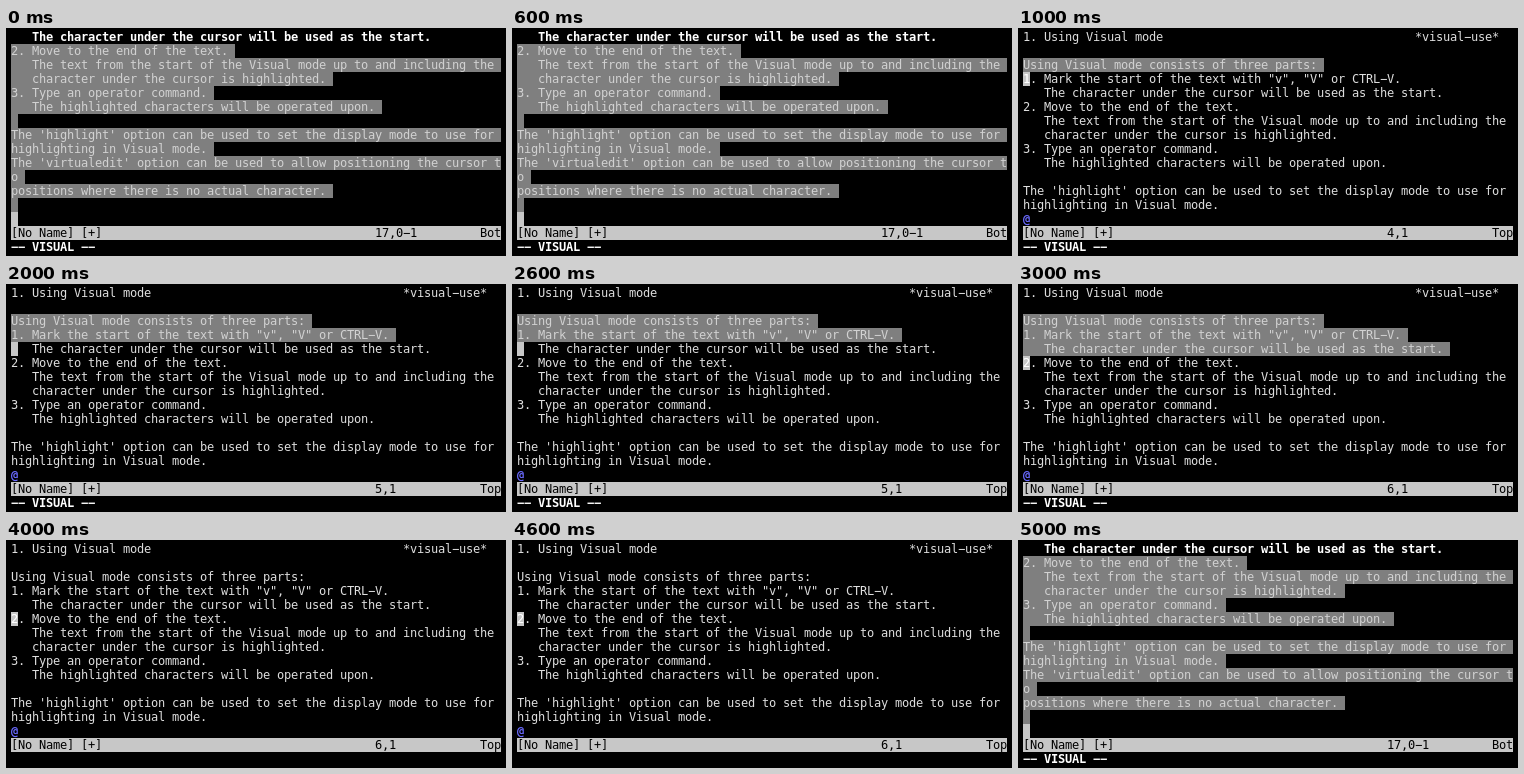
These frames come from a looping animation (500 by 228 pixels, 6000 ms). An HTML page with a canvas:

```html
<!DOCTYPE html>
<html lang="en">
<head>
<meta charset="utf-8">
<title>Visual mode</title>
<style>
  html, body { margin: 0; width: 100%; height: 100%; overflow: hidden; background: #000; }
  canvas { display: block; width: 500px; height: 228px; }
</style>
</head>
<body>
<canvas id="screen" width="500" height="228"></canvas>
<script>
const CELL = { w: 7, h: 14, left: 5, top: 2, baseline: 11 };
const COLUMNS = 70, TEXT_ROWS = 14;
const COLOR = {
  back: '#000', text: '#dedede', bright: '#fff', select: '#7f7f7f',
  selected: '#d2d2d2', bar: '#c7c7c7', filler: '#6a6aff'
};

const buffer = [
  '1. Using Visual mode'.padEnd(56) + '*visual-use*',
  '',
  'Using Visual mode consists of three parts:',
  '1. Mark the start of the text with "v", "V" or CTRL-V.',
  '   The character under the cursor will be used as the start.',
  '2. Move to the end of the text.',
  '   The text from the start of the Visual mode up to and including the',
  '   character under the cursor is highlighted.',
  '3. Type an operator command.',
  '   The highlighted characters will be operated upon.',
  '',
  "The 'highlight' option can be used to set the display mode to use for",
  'highlighting in Visual mode.',
  "The 'virtualedit' option can be used to allow positioning the cursor t",
  'o',
  'positions where there is no actual character.',
  '',
  ''
];

// Line numbers are buffer indexes; from = first selected line, or null.
const bottom = { scroll: 4, from: 5, cursor: 17, ruler: '17,0-1', place: 'Bot', strong: 4 };
const top_ = (from, cursor, ruler) => ({ scroll: 0, from, cursor, ruler, place: 'Top' });
const steps = [
  bottom,
  top_(2, 3, '4,1'),
  top_(2, 4, '5,1'),
  top_(2, 5, '6,1'),
  top_(null, 5, '6,1'),
  bottom
];
const STEP_MS = 1000;

const ctx = document.getElementById('screen').getContext('2d', { alpha: false });

function fillCells(col, row, count, color) {
  ctx.fillStyle = color;
  ctx.fillRect(CELL.left + col * CELL.w, CELL.top + row * CELL.h, count * CELL.w, CELL.h);
}

function write(text, col, row, color, weight = 'normal') {
  ctx.font = `${weight} 12px "DejaVu Sans Mono", monospace`;
  ctx.fillStyle = color;
  const y = CELL.top + row * CELL.h + CELL.baseline;
  // The wide minus matches the terminal's long hyphen.
  [...text.replace(/-/g, '\u2212')].forEach((char, i) => {
    if (char !== ' ') ctx.fillText(char, CELL.left + (col + i) * CELL.w, y);
  });
}

function drawLine(state, row) {
  const line = row + state.scroll;
  const text = buffer[line];
  const selected = state.from !== null && line >= state.from && line < state.cursor;
  if (selected) fillCells(0, row, Math.min(text.length + 1, COLUMNS), COLOR.select);
  if (line === state.cursor) fillCells(0, row, 1, COLOR.bar);

  const strong = line === state.strong;
  const color = selected ? COLOR.selected : strong ? COLOR.bright : COLOR.text;
  write(text, 0, row, color, strong ? 'bold' : 'normal');
  if (line === state.cursor) write(text.slice(0, 1), 0, row, COLOR.bright);
}

function draw(state) {
  ctx.fillStyle = COLOR.back;
  ctx.fillRect(0, 0, 500, 228);
  for (let row = 0; row < TEXT_ROWS; row++) {
    // A wrapped line that does not fit is shown as a filler mark.
    if (state.scroll === 0 && row === TEXT_ROWS - 1) write('@', 0, row, COLOR.filler, 'bold');
    else drawLine(state, row);
  }
  fillCells(0, TEXT_ROWS, COLUMNS, COLOR.bar);
  write('[No Name] [+]', 0, TEXT_ROWS, COLOR.back);
  write(state.ruler, 52, TEXT_ROWS, COLOR.back);
  write(state.place, 67, TEXT_ROWS, COLOR.back);
  if (state.from !== null) write('-- VISUAL --', 0, TEXT_ROWS + 1, COLOR.bright, 'bold');
}

const start = performance.now();
let shown = null;
function tick() {
  const elapsed = performance.now() - start;
  const state = steps[Math.floor(elapsed / STEP_MS) % steps.length];
  if (state !== shown) draw(shown = state);
  requestAnimationFrame(tick);
}
tick();
</script>
</body>
</html>
```
